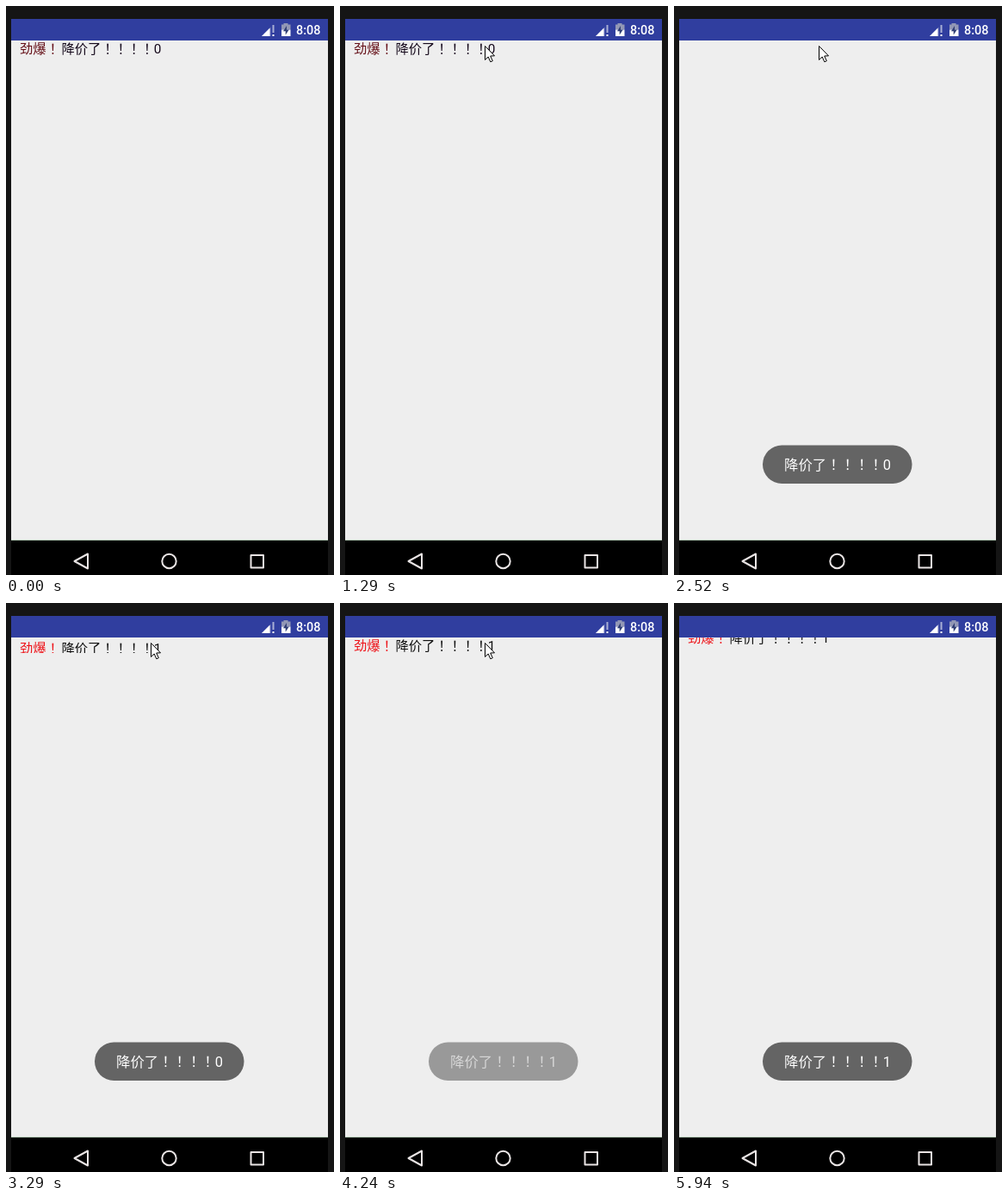
Animation, 381 px wide and 660 px high, one loop 6010 ms. Source, as an HTML page with a canvas:

```html
<!DOCTYPE html>
<html lang="zh">
<head>
<meta charset="utf-8">
<style>
  html, body { margin: 0; width: 100%; height: 100%; overflow: hidden; background: #151515; }
  canvas { display: block; }
</style>
</head>
<body>
<canvas id="stage" width="381" height="660"></canvas>
<script>
const ctx = document.getElementById('stage').getContext('2d');
const LOOP = 6010;
const SCROLL_SPEED = 0.0175; // px per ms
const HEADLINE = '降价了！！！！';

const clamp01 = v => Math.min(1, Math.max(0, v));
const progress = (t, from, to) => clamp01((t - from) / (to - from));
const mix = (a, b, u) => a + (b - a) * u;

function rect(color, x, y, w, h) {
  ctx.fillStyle = color;
  ctx.fillRect(x, y, w, h);
}

function tracePoly(points) {
  ctx.beginPath();
  points.forEach(([x, y]) => ctx.lineTo(x, y));
  ctx.closePath();
}

function fillPoly(color, points) {
  tracePoly(points);
  ctx.fillStyle = color;
  ctx.fill();
}

// Fullwidth exclamation marks sit centred in their cell, as in the Japanese face.
function fontFor(ch, size) {
  if (ch === '！') return `${size}px "Noto Sans CJK JP", sans-serif`;
  if (/\d/.test(ch)) return `${size}px Roboto, sans-serif`;
  return `${size}px "Noto Sans CJK SC", "Noto Sans CJK JP", sans-serif`;
}

function drawText(text, x, y, size, color) {
  ctx.fillStyle = color;
  for (const ch of text) {
    ctx.font = fontFor(ch, size);
    ctx.fillText(ch, x, y);
    x += ctx.measureText(ch).width;
  }
}

function drawStatusBar() {
  rect('#303e9f', 6, 15, 368, 25);

  fillPoly('rgba(255,255,255,.3)', [[297, 35], [312, 35], [312, 20]]);
  fillPoly('#fff', [[297, 35], [306.5, 35], [306.5, 25.5]]);
  rect('#303e9f', 307.5, 20, 5, 16);
  rect('#a9afd6', 309.5, 22, 2, 9);
  rect('#fff', 309.5, 33, 2, 2);

  rect('#9297b5', 322.5, 20, 5, 2);
  rect('#9297b5', 320, 21.5, 10.5, 6);
  rect('#fff', 320, 27.5, 10.5, 7.5);
  fillPoly('#303e75', [[326, 23], [322, 29.3], [324.7, 29.3], [324.7, 33.5], [328.7, 27.5], [326, 27.5]]);

  ctx.fillStyle = '#fff';
  ctx.font = '500 14.4px Roboto, sans-serif';
  ctx.fillText('8:08', 337, 33);
}

function drawNavBar() {
  rect('#000', 6, 620, 368, 40);
  rect('#b4c8b6', 6, 619, 368, 1);
  ctx.strokeStyle = '#e9e4e4';
  ctx.lineWidth = 2;
  ctx.lineJoin = 'round';
  tracePoly([[79.5, 644], [95, 635.5], [95, 652.5]]);
  ctx.stroke();
  ctx.beginPath();
  ctx.arc(189.5, 644, 8.2, 0, Math.PI * 2);
  ctx.stroke();
  tracePoly([[284.5, 637], [299, 637], [299, 651.5], [284.5, 651.5]]);
  ctx.stroke();
}

function drawHeadline(digit, offset, red, black) {
  drawText('劲爆！', 16, 55 + offset, 15.33, red);
  drawText(HEADLINE + digit, 64.4, 55 + offset, 15.33, black);
}

function drawTicker(t) {
  const settled = t < 1435;
  const red = settled ? '#651018' : '#ee1218';
  const black = settled ? '#160a1c' : '#111';
  ctx.save();
  ctx.beginPath();
  ctx.rect(6, 40, 368, 18);
  ctx.clip();
  drawHeadline('0', -Math.max(0, t - 1435) * SCROLL_SPEED, red, black);
  const entering = Math.max(0, 3465 - t);
  const leaving = Math.max(0, t - 5435);
  drawHeadline('1', (entering - leaving) * SCROLL_SPEED, red, black);
  ctx.restore();
}

function drawToast(digit, alpha) {
  if (alpha <= 0) return;
  ctx.save();
  ctx.globalAlpha = alpha;
  ctx.fillStyle = '#646464';
  ctx.beginPath();
  ctx.roundRect(103, 509.5, 173.5, 44.5, 22.25);
  ctx.fill();
  drawText(HEADLINE + digit, 128, 538, 16.4, '#fff');
  ctx.restore();
}

function drawCursor(x, y) {
  ctx.save();
  ctx.translate(x + 0.5, y + 0.5);
  tracePoly([[0, 0], [0, 16], [3.7, 12.5], [6.3, 18.3], [8.8, 17.2], [6.2, 11.5], [11, 11.3]]);
  ctx.fillStyle = '#fff';
  ctx.fill();
  ctx.strokeStyle = '#000';
  ctx.lineWidth = 1;
  ctx.lineJoin = 'miter';
  ctx.stroke();
  ctx.restore();
}

function drawPointer(t) {
  if (t < 290 || t >= 5230) return;
  if (t < 4800) {
    const left = 1 - progress(t, 290, 1100);
    drawCursor(mix(168, 312, left ** 1.2), mix(46, 592, left ** 2.4));
  } else {
    const u = progress(t, 4800, 5165) ** 1.6;
    drawCursor(mix(168, 334, u), mix(46, 605, u));
  }
}

function draw(t) {
  rect('#151515', 0, 0, 381, 660);
  rect('#eee', 6, 40, 368, 580);
  drawStatusBar();
  drawNavBar();
  drawTicker(t);
  drawToast('0', progress(t, 1465, 1845) - progress(t, 3550, 3930));
  drawToast('1', progress(t, 4010, 4390));
  drawPointer(t);
}

const start = performance.now();
function tick() {
  draw((performance.now() - start) % LOOP);
  requestAnimationFrame(tick);
}
tick();
</script>
</body>
</html>
```
